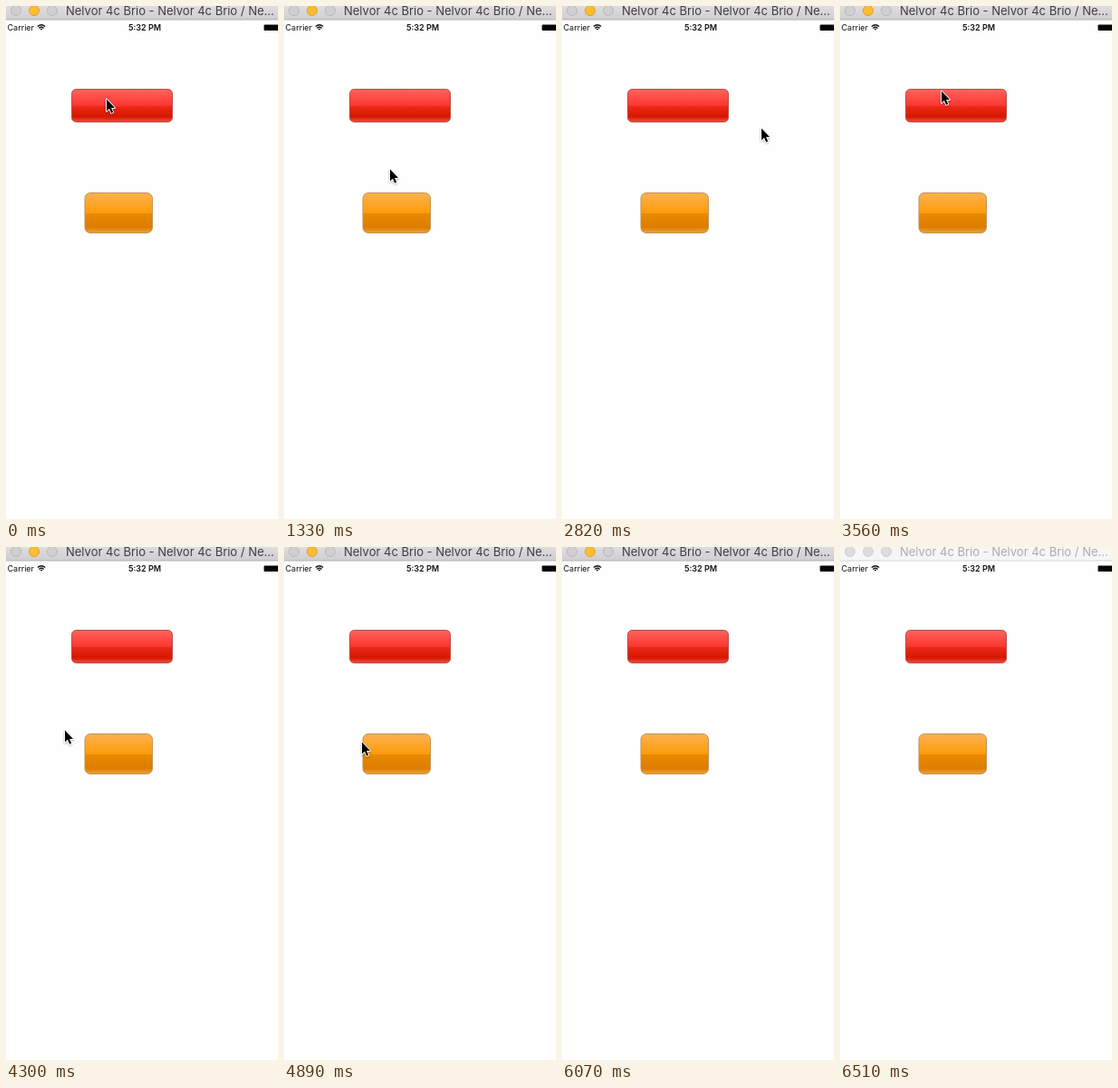
These frames come from a looping animation (300 px wide and 564 px high, 6.57 s). An HTML page:

```html
<!DOCTYPE html>
<html lang="en">
<head>
<meta charset="utf-8">
<title>Two buttons</title>
<style>
  html, body { margin: 0; width: 100%; height: 100%; overflow: hidden; background: #fefefe; }
  svg { display: block; width: 300px; height: 564px; }
  text { font-family: Inter, "Liberation Sans", sans-serif; }
  .title { font-size: 13px; fill: #403f40; }
  .status { font-size: 9px; fill: #111; }
  .light { fill: #d0cfd0; stroke: #b9b8b9; }
  .light.minimise { fill: #fdbd2e; stroke: #e0a030; }
  .inactive .bar { fill: #f6f6f6; }
  .inactive .edge { fill: #d4d4d4; }
  .inactive .title { fill: #acacac; }
  .inactive .light { fill: #dcdcdc; stroke: #d0d0d0; }
</style>
</head>
<body>
<svg viewBox="0 0 300 564">
  <defs>
    <linearGradient id="chrome" x2="0" y2="1">
      <stop stop-color="#dedcde"/><stop offset="1" stop-color="#d0ced0"/>
    </linearGradient>
    <linearGradient id="red" x2="0" y2="1">
      <stop stop-color="#fb6660"/><stop offset=".12" stop-color="#ff5852"/>
      <stop offset=".51" stop-color="#fb3530"/><stop offset=".51" stop-color="#ec2a18"/>
      <stop offset=".84" stop-color="#d61700"/><stop offset="1" stop-color="#ee5040"/>
    </linearGradient>
    <linearGradient id="orange" x2="0" y2="1">
      <stop stop-color="#f9b050"/><stop offset=".1" stop-color="#fdad42"/>
      <stop offset=".51" stop-color="#fd9b0a"/><stop offset=".51" stop-color="#e98a00"/>
      <stop offset=".86" stop-color="#dc7d00"/><stop offset="1" stop-color="#f0a13c"/>
    </linearGradient>
    <filter id="shadow" x="-50%" y="-50%" width="200%" height="200%">
      <feDropShadow dx="0" dy="1" stdDeviation=".8" flood-opacity=".35"/>
    </filter>
  </defs>

  <g id="window">
    <rect class="bar" width="300" height="15" fill="url(#chrome)"/>
    <rect class="edge" y="14.5" width="300" height="1" fill="#b4b2b4"/>
    <circle class="light" cx="11" cy="5" r="5.5"/>
    <circle class="light minimise" cx="31" cy="5" r="5.5"/>
    <circle class="light" cx="51" cy="5" r="5.5"/>
    <text class="title" x="66" y="10">Nelvor 4c Brio - Nelvor 4c Brio / Ne...</text>
  </g>

  <text class="status" x="1.5" y="27">Carrier</text>
  <g fill="none" stroke="#111" stroke-width="1.3">
    <path d="M34.8 22.6Q39 18.8 43.2 22.6M36.4 24.4Q39 22 41.6 24.4"/>
    <path d="M37.7 25.2L39 26.8L40.3 25.2Q39 24.4 37.7 25.2Z" fill="#111" stroke="none"/>
  </g>
  <text class="status" x="153" y="27" text-anchor="middle" font-weight="600">5:32 PM</text>
  <rect x="284.5" y="20.5" width="20" height="6.5" rx="1" fill="#050505"/>

  <rect x="72.5" y="91.5" width="111" height="36" rx="5" fill="url(#red)" stroke="#b5524c"/>
  <rect x="87" y="205.5" width="74.5" height="44" rx="6" fill="url(#orange)" stroke="#c29455"/>

  <path id="pointer" d="M1 1.5v13l3-2.8l2.2 5l2-.9l-2.2-4.8h4z" stroke="#fff" stroke-width="1.8"
        stroke-linejoin="round" paint-order="stroke" filter="url(#shadow)"/>
</svg>
<script>
const LOOP = 6570, HIDE_AT = 6070, BLUR_AT = 6510, STEP = 145;
const pointer = document.getElementById('pointer');
const appWindow = document.getElementById('window');

// Each move curves from where the last one ended through its waypoints, in visible steps.
const moves = [
  { start: 0, steps: 1, via: [[110, 101]] },
  { start: 150, steps: 3, via: [[121, 107]] },
  { start: 1330, steps: 3, via: [[114, 210], [115, 231]] },
  { start: 2230, steps: 8, via: [[60, 140], [190, 66], [217, 198], [100, 107]] },
  { start: 3410, steps: 2, via: [[111, 92]] },
  { start: 3860, steps: 8, via: [[72, 145], [64, 200], [186, 240], [85, 213]] },
  { start: 5030, steps: 3, via: [[88, 246], [118, 220]] },
  { start: 5630, steps: 3, via: [[197, 500]] }
];
moves.forEach((move, i) => {
  const origin = i ? moves[i - 1].via.at(-1) : move.via[0];
  move.points = [origin, ...move.via];
});

// Catmull-Rom curve through evenly timed points, u from 0 to 1.
function curve(points, u) {
  const last = points.length - 1;
  const i = Math.min(Math.floor(u * last), last - 1);
  const s = u * last - i;
  const [a, b, c, d] = [i - 1, i, i + 1, i + 2].map(k => points[Math.max(0, Math.min(last, k))]);
  return [0, 1].map(k => b[k] + s / 2 * (c[k] - a[k]
    + s * (2 * a[k] - 5 * b[k] + 4 * c[k] - d[k] + s * (3 * (b[k] - c[k]) + d[k] - a[k]))));
}

function tipAt(time) {
  const { start, steps, points } = moves.findLast(move => move.start <= time);
  const step = Math.min(steps, Math.floor((time - start) / STEP) + 1);
  return curve(points, step / steps).map(Math.round);
}

function draw(now) {
  const time = now % LOOP;
  pointer.setAttribute('transform', `translate(${tipAt(time)})`);
  pointer.style.display = time < HIDE_AT ? '' : 'none';
  appWindow.classList.toggle('inactive', time >= BLUR_AT);
}

const begin = performance.now();
function tick() {
  draw(performance.now() - begin);
  requestAnimationFrame(tick);
}
tick();
</script>
</body>
</html>
```
